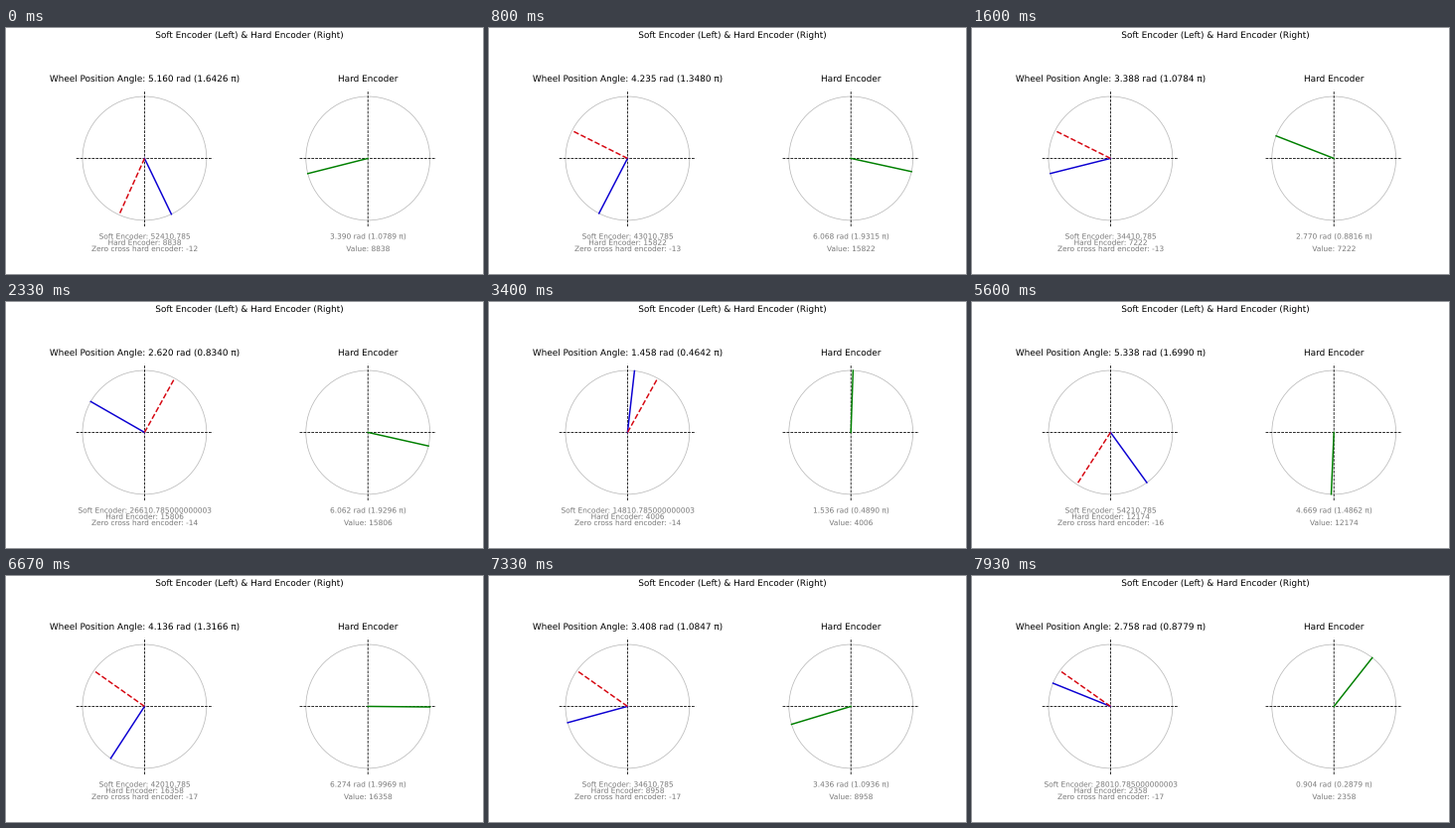
Write a matplotlib script that moves like this. It is 480 px wide and 248 px high and loops after 8000 ms.

```python
import numpy as np
import matplotlib.pyplot as plt
from matplotlib.animation import FuncAnimation
from matplotlib.patches import Circle
from matplotlib.patheffects import Normal

W, H = 480, 248
S = 8 / 15                 # shrinks a 9 inch layout to the stage
LOOP, TICK = 8000, 20      # ms
STEP = 200                 # encoder counts per wheel step
WHEEL = 63815.5            # counts per wheel turn
WRAP = 64000               # added when the soft count runs below zero
HARD = 16384               # counts per hard encoder turn
SOFT_START, TOTAL_START = 52410.785, -187770
R, CY = 62.4, 131.45
ARM = 1.1 * R
LEFT, RIGHT = 139.4, 364.2

# Wheel steps done by each picture; the pace drifts a little
PICTURES = [0, 12, 35, 51, 69, 100, 119]
STEPS = [0, 47, 129, 188, 254, 372, 442]

plt.rcParams["font.family"] = "DejaVu Sans"
plt.rcParams["text.hinting"] = "none"

fig = plt.figure(figsize=(W / 100, H / 100), dpi=100, facecolor="white")
ax = fig.add_axes([0, 0, 1, 1])
ax.set_xlim(0, W)
ax.set_ylim(H, 0)
ax.axis("off")


def label(x, y, text="", size=10, color="#7a7a7a"):
    # The path effect draws glyphs as outlines, free of the pixel grid
    return ax.text(x, y, text, fontsize=size * S, color=color, ha="center",
                   va="baseline", path_effects=[Normal()])


def note(cx, row):
    return label(cx, CY + row * R)


def dial(cx):
    ax.add_patch(Circle((cx, CY), R, fill=False, ec="#b8b8b8", lw=S))
    ax.plot([cx - ARM, cx + ARM], [CY, CY], "k--", lw=1.1 * S,
            dashes=(3.36, 1.45), snap=False)
    ax.plot([cx, cx], [CY + ARM, CY - ARM], "k--", lw=1.1 * S,
            dashes=(3.36, 1.45), snap=False)


def hand(color, style="-"):
    return ax.plot([], [], style, color=color, lw=2 * S, zorder=3,
                   snap=False)[0]


def point(line, cx, angle):
    line.set_data([cx, cx + R * np.cos(angle)], [CY, CY - R * np.sin(angle)])


def radians(angle):
    return f"{angle:.3f} rad ({angle / np.pi:.4f} π)"


dial(LEFT)
dial(RIGHT)
label(245, 10, "Soft Encoder (Left) & Hard Encoder (Right)", 12, "black")
label(RIGHT, 54, "Hard Encoder", 12, "black")
title = label(LEFT, 54, size=12, color="black")
soft_text = note(LEFT, 1.3)
hard_text = note(LEFT, 1.4)
cross_text = note(LEFT, 1.5)
angle_text = note(RIGHT, 1.3)
value_text = note(RIGHT, 1.5)
wheel_hand = hand("#0c00d2")
zero_hand = hand("#d60610", "--")
hard_hand = hand("green")


def update(i):
    # 15 pictures a second, with starts rounded to 10 ms
    t = i * TICK + TICK / 2
    picture = int((t + 5) * 15 / 1000)
    k = int(round(np.interp(picture, PICTURES, STEPS)))

    soft = SOFT_START - STEP * k
    if soft < 0:
        soft += WRAP
    crossings, value = divmod(TOTAL_START - STEP * k, HARD)
    wheel = 2 * np.pi * soft / WHEEL
    hard = 2 * np.pi * value / (HARD - 1)

    point(wheel_hand, LEFT, wheel)
    point(zero_hand, LEFT, 2 * np.pi * (soft - value) / WHEEL)
    point(hard_hand, RIGHT, hard)
    title.set_text(f"Wheel Position Angle: {radians(wheel)}")
    soft_text.set_text(f"Soft Encoder: {soft}")
    hard_text.set_text(f"Hard Encoder: {value}")
    cross_text.set_text(f"Zero cross hard encoder: {crossings}")
    angle_text.set_text(radians(hard))
    value_text.set_text(f"Value: {value}")
    return (wheel_hand, zero_hand, hard_hand, title, soft_text, hard_text,
            cross_text, angle_text, value_text)


anim = FuncAnimation(fig, update, frames=LOOP // TICK, interval=TICK,
                     repeat=True, repeat_delay=0, blit=False)
plt.show()
```
